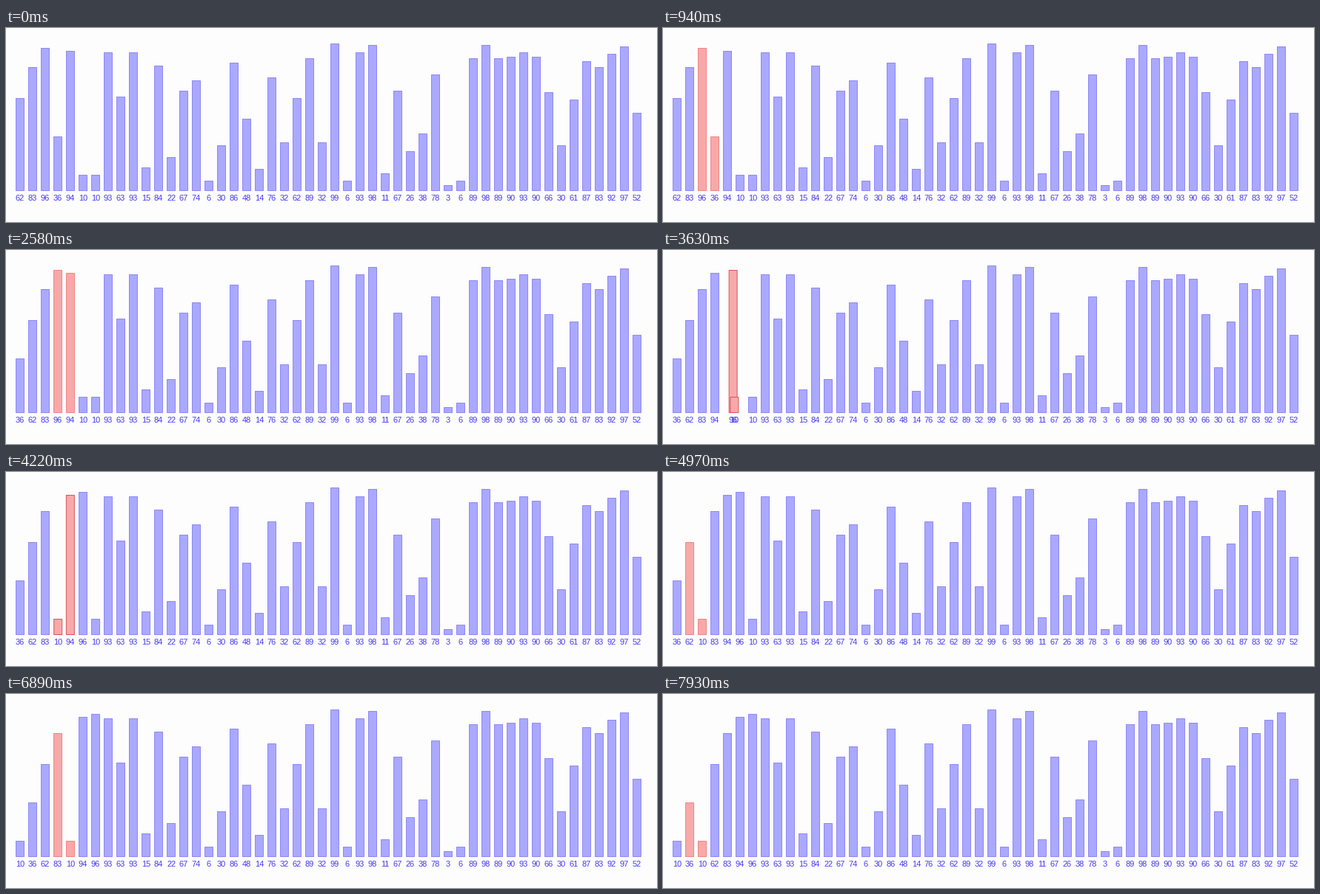
A matplotlib script for the animation above (8000 ms loop, 879 by 263 pixels).

```python
import matplotlib.pyplot as plt
from matplotlib.animation import FuncAnimation
from matplotlib.patches import Rectangle

WIDTH, HEIGHT, DPI = 879, 263, 64
LOOP_MS, INTERVAL = 8000, 20

VALUES = [62, 83, 96, 36, 94, 10, 10, 93, 63, 93, 15, 84, 22, 67, 74, 6, 30,
          86, 48, 14, 76, 32, 62, 89, 32, 99, 6, 93, 98, 11, 67, 26, 38, 78,
          3, 6, 89, 98, 89, 90, 93, 90, 66, 30, 61, 87, 83, 92, 97, 52]

PITCH, LEFT, BASE = 17, 13.5, 220.5
BAR_WIDTH = 11
IDLE = ("#aaa9ff", "#8f88f5")
COMPARE = ("#f7a9aa", "#f18585")
SWAP = ("#f7a9aa", "#dd535a")
LABEL = "#4437fa"

# Times below are counted in ticks: the picture only refreshes once per tick.
TICK_MS, FIRST_TICK_MS = 148.7, 492
FIRST_START, COMPARE_TICKS, SWAP_TICKS, MOVE_TICKS = -0.71, 1.855, 1.605, 1.0
LAST_TICK = (LOOP_MS - FIRST_TICK_MS) / TICK_MS


def insertion_sort_steps():
    """Return (start, left slot, is swap, order before the step) tuples."""
    order = list(range(len(VALUES)))
    steps, clock = [], FIRST_START
    for i in range(1, len(order)):
        for left in range(i - 1, -1, -1):
            steps.append((clock, left, False, order[:]))
            clock += COMPARE_TICKS
            if VALUES[order[left]] <= VALUES[order[left + 1]]:
                break
            steps.append((clock, left, True, order[:]))
            clock += SWAP_TICKS
            order[left], order[left + 1] = order[left + 1], order[left]
        if clock > LAST_TICK:
            return steps
    return steps


STEPS = insertion_sort_steps()

fig = plt.figure(figsize=(WIDTH / DPI, HEIGHT / DPI), dpi=DPI,
                 facecolor="#fdfdfd")
ax = fig.add_axes([0, 0, 1, 1])
ax.set_xlim(0, WIDTH)
ax.set_ylim(HEIGHT, 0)
ax.axis("off")

px = 72 / DPI
bars, labels = [], []
for index, value in enumerate(VALUES):
    bar = Rectangle((0, BASE), BAR_WIDTH, -(2 * value + 1), linewidth=px,
                    joinstyle="miter", snap=False, zorder=1 + index / 100)
    bars.append(ax.add_patch(bar))
    labels.append(ax.text(0, 234, str(value), color=LABEL, ha="center",
                          va="baseline", family="Liberation Sans",
                          fontsize=11 * px, zorder=3))


def place(index, slot, colors):
    x = LEFT + PITCH * slot
    bars[index].set_x(x)
    bars[index].set_facecolor(colors[0])
    bars[index].set_edgecolor(colors[1])
    labels[index].set_x(x + BAR_WIDTH / 2)


def draw(frame):
    time = frame * INTERVAL + INTERVAL / 2
    tick = (time - FIRST_TICK_MS) // TICK_MS
    order = range(len(VALUES))
    step = None
    if tick >= 0:
        step = [s for s in STEPS if s[0] <= tick][-1]
        order = step[3]
    for slot, index in enumerate(order):
        place(index, slot, IDLE)
    if step:
        start, left, swapping, _ = step
        shift = min((tick - start) / MOVE_TICKS, 1) if swapping else 0
        colors = SWAP if swapping else COMPARE
        place(order[left], left + shift, colors)
        place(order[left + 1], left + 1 - shift, colors)
    return bars + labels


anim = FuncAnimation(fig, draw, frames=LOOP_MS // INTERVAL, interval=INTERVAL,
                     repeat=True, repeat_delay=0, blit=False)
plt.show()
```
